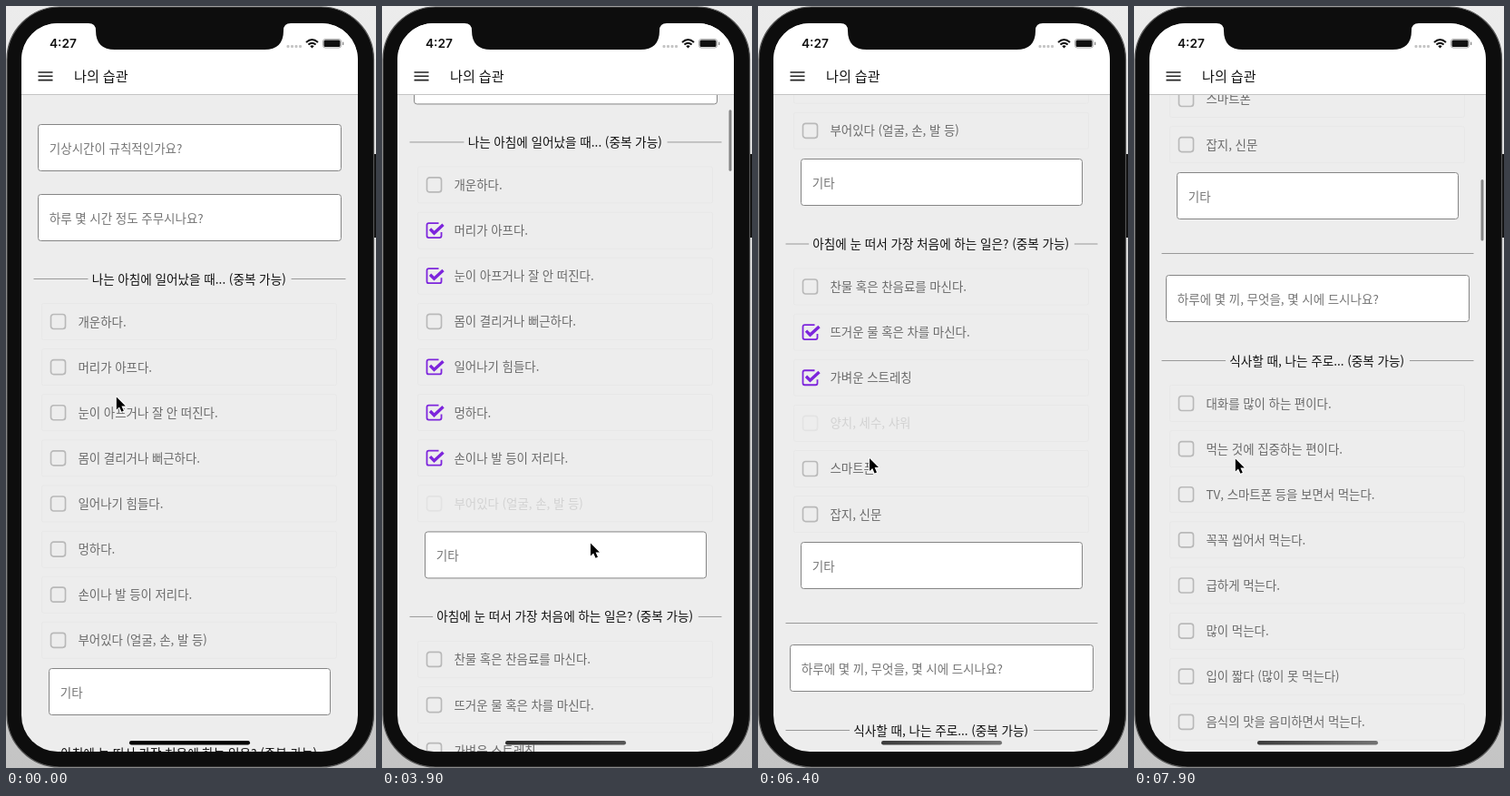
An HTML page with a canvas that plays this animation: 408 px wide and 839 px high, repeating every 8 s.

```html
<!DOCTYPE html>
<html lang="ko">
<head>
<meta charset="utf-8">
<style>
html, body { margin: 0; width: 100%; height: 100%; overflow: hidden; }
canvas { display: block; }
</style>
</head>
<body>
<canvas id="stage" width="408" height="839"></canvas>
<script>
const ctx = document.getElementById('stage').getContext('2d');
const LOOP = 8000, STEP = 100, ROW = 50.12, TAP = 320;
const KOREAN = '"Noto Sans CJK KR", "Noto Sans CJK", sans-serif';
const INK = '#111', BEZEL = '#0d0d0d', LINE = '#999', PURPLE = '#7d25dc';

// Page positions are measured at scroll 0.
const questions = [
  { y: 130.5, label: '기상시간이 규칙적인가요?' },
  { y: 207.5, label: '하루 몇 시간 정도 주무시나요?' },
  { y: 1264.5, label: '하루에 몇 끼, 무엇을, 몇 시에 드시나요?' },
];
const sections = [
  {
    title: '나는 아침에 일어났을 때... (중복 가능)', y: 300.5, other: true,
    rows: ['개운하다.', '머리가 아프다.', '눈이 아프거나 잘 안 떠진다.', '몸이 결리거나 뻐근하다.',
      '일어나기 힘들다.', '멍하다.', '손이나 발 등이 저리다.', '부어있다 (얼굴, 손, 발 등)'],
  },
  {
    title: '아침에 눈 떠서 가장 처음에 하는 일은? (중복 가능)', y: 823, other: true,
    rows: ['찬물 혹은 찬음료를 마신다.', '뜨거운 물 혹은 차를 마신다.', '가벼운 스트레칭',
      '양치, 세수, 샤워', '스마트폰', '잡지, 신문'],
  },
  {
    title: '식사할 때, 나는 주로... (중복 가능)', y: 1358.5,
    rows: ['대화를 많이 하는 편이다.', '먹는 것에 집중하는 편이다.', 'TV, 스마트폰 등을 보면서 먹는다.',
      '꼭꼭 씹어서 먹는다.', '급하게 먹는다.', '많이 먹는다.', '입이 짧다 (많이 못 먹는다)',
      '음식의 맛을 음미하면서 먹는다.'],
  },
];

const clamp = v => Math.min(1, Math.max(0, v));
const ramp = (t, start, length) => clamp((t - start) / length);
const ease = p => p * p * (3 - 2 * p);
const rowY = (section, i) => section.y + 47 + i * ROW;

const flicks = [
  { start: 3650, length: 735, distance: 561 },
  { start: 6670, length: 800, distance: 407 },
];
const scrollAt = t => flicks.reduce((sum, f) => sum + f.distance * ease(ramp(t, f.start, f.length)), 0);
const barAlpha = t => Math.max(...flicks.map(f =>
  ramp(t, f.start, 100) - ramp(t, f.start + f.length + 800, 300)));

// Evenly timed taps; each dims its row, then ticks the box.
const tapSeries = (section, rows, start, gap) =>
  rows.map((row, i) => ({ section, row, time: start + i * gap, ticks: true }));
const taps = [
  ...tapSeries(sections[0], [1, 2, 4, 5, 6], 900, 600),
  ...tapSeries(sections[1], [1, 2, 3], 5500, 300),
];
const heldRow = { section: sections[0], row: 7, time: flicks[0].start, ticks: false };
const presses = [...taps, heldRow];
const pressAlpha = (press, t) => 1 - 0.8 * (ramp(t, press.time, 100) - ramp(t, press.time + TAP, 250));

// The pointer rests on each tapped box and glides through a few free points.
const pointerStops = [
  ...taps.flatMap(({ section, row, time }) => {
    const y = rowY(section, row) - scrollAt(time) - 4;
    return [[time - 50, 60, y], [time + 50, 60, y]];
  }),
  [0, 121, 430], [1600, 64, 490], [3000, 85, 633], [3650, 235, 700], [4100, 225, 513],
  [4700, 126, 458], [5100, 126, 458], [6670, 192, 545], [7000, 188, 404], [7900, 111, 498],
].sort((a, b) => a[0] - b[0]);

function pointerAt(t) {
  const i = pointerStops.findIndex(stop => stop[0] > t);
  if (i < 0) return pointerStops.at(-1).slice(1);
  const [t0, x0, y0] = pointerStops[i - 1], [t1, x1, y1] = pointerStops[i];
  const p = ease((t - t0) / (t1 - t0));
  return [x0 + (x1 - x0) * p, y0 + (y1 - y0) * p];
}

function text(str, x, y, color, size = 13.5, weight = 400, family = KOREAN) {
  ctx.font = `${weight} ${size}px ${family}`;
  ctx.wordSpacing = '0.6px';
  ctx.fillStyle = color;
  ctx.fillText(str, x, y);
  return ctx.measureText(str).width;
}

function roundBox(x, y, w, h, r, fill, stroke, width = 1) {
  ctx.beginPath();
  ctx.roundRect(x, y, w, h, r);
  if (fill) { ctx.fillStyle = fill; ctx.fill(); }
  if (stroke) { ctx.strokeStyle = stroke; ctx.lineWidth = width; ctx.stroke(); }
}

function strokePath(d, color, width = 1) {
  ctx.strokeStyle = color;
  ctx.lineWidth = width;
  ctx.stroke(new Path2D(d));
}

function fillPath(d, color) {
  ctx.fillStyle = color;
  ctx.fill(new Path2D(d));
}

function drawInput(label, x, y) {
  roundBox(x, y, 405 - 2 * x, 51, 3, '#fff', '#858585');
  text(label, x + 12.3, y + 31, '#757575');
}

function drawHeading(title, y) {
  ctx.textAlign = 'center';
  const gap = text(title, 201.7, y + 5, INK, 13.62, 500) / 2 + 5;
  ctx.textAlign = 'left';
  strokePath(`M30.5 ${y}H${202.5 - gap}M${202.5 + gap} ${y}H374.5`, LINE);
}

function drawRow(label, y, press, t) {
  roundBox(39.5, y - 20, 325, 40, 2, null, '#e8e8e8');
  ctx.save();
  if (press) ctx.globalAlpha = pressAlpha(press, t);
  text(label, 79.5, y + 5, '#6a6a6a', 13.45, 300);
  ctx.translate(49.5, y - 8);
  if (press && press.ticks && t >= press.time + TAP) {
    strokePath('M13 0H2Q0 0 0 2V14Q0 16 2 16H14Q16 16 16 14V10', PURPLE, 1.8);
    strokePath('M3.5 6.5L8 11L18 1.8', PURPLE, 3.4);
  } else {
    roundBox(0, 0, 16, 16, 3, null, '#b9b9b9', 1.7);
  }
  ctx.restore();
}

function drawSection(section, t) {
  drawHeading(section.title, section.y);
  section.rows.forEach((label, i) => {
    const press = presses.find(p => p.section === section && p.row === i);
    drawRow(label, rowY(section, i), press, t);
  });
  if (section.other) drawInput('기타', 47.5, Math.floor(rowY(section, section.rows.length) - 19) + 0.5);
}

function drawPage(t, scroll) {
  ctx.save();
  ctx.translate(0, -scroll);
  questions.forEach(({ label, y }) => drawInput(label, 35.5, y));
  strokePath('M30.5 1240.5H374.5', LINE);
  sections.forEach(section => drawSection(section, t));
  ctx.restore();
  ctx.globalAlpha = barAlpha(t);
  roundBox(382.5, 100 + scroll * 0.094, 3, 67.5, 1.5, '#858585');
  ctx.globalAlpha = 1;
}

function drawHeader() {
  ctx.fillStyle = '#fff';
  ctx.fillRect(17, 19, 371, 78);
  strokePath('M17 97.5H388', '#c4c4c4');
  strokePath('M35.5 73H51.5M35.5 77.3H51.5M35.5 81.6H51.5', '#222', 1.6);
  text('나의 습관', 75, 83, INK, 15.1, 500);
  text('4:27', 48, 46, INK, 13.7, 600, 'Inter, sans-serif');
  for (let x = 309.5; x < 325; x += 4.5) roundBox(x, 43, 3, 3, 1, '#c4c4c4');
  strokePath('M331 40Q337.5 34 344 40M333.4 42.6Q337.5 38.8 341.6 42.6', INK, 2);
  fillPath('M335.3 44.2Q337.5 42.2 339.7 44.2L337.5 46.6Z', INK);
  roundBox(349.5, 36.5, 20, 9.5, 2.5, null, '#aaa');
  roundBox(350.5, 37.5, 18, 7.5, 1.5, INK);
  roundBox(371, 39.5, 1.3, 3.5, 0.6, '#888');
}

function drawPhone() {
  const backdrop = ctx.createLinearGradient(0, 0, 0, 839);
  backdrop.addColorStop(0, '#ececec');
  backdrop.addColorStop(1, '#c4c4c4');
  ctx.fillStyle = backdrop;
  ctx.fillRect(0, 0, 408, 839);
  ctx.fillStyle = INK;
  ctx.fillRect(403, 163, 5, 92);
  roundBox(1, 1, 404.5, 837, 58, BEZEL, '#555', 1.2);
}

function drawHomeBar(scroll) {
  const shade = v => `rgb(${Array(3).fill(v * clamp(scroll / 200))})`;
  const fill = ctx.createLinearGradient(136, 0, 269, 0);
  fill.addColorStop(0, shade(60));
  fill.addColorStop(1, shade(115));
  roundBox(136, 809, 133, 4.5, 2.2, fill);
}

function drawPointer([x, y]) {
  const arrow = 'M0 0V14L3.2 10.9L5.6 16.3L8 15.3L5.6 10H10Z';
  ctx.save();
  ctx.translate(x + 0.8, y + 0.5);
  ctx.lineJoin = 'round';
  strokePath(arrow, '#fff', 2);
  fillPath(arrow, '#000');
  ctx.restore();
}

function draw(t) {
  const scroll = scrollAt(t);
  drawPhone();
  ctx.save();
  ctx.beginPath();
  ctx.roundRect(17, 19, 371, 802, 40);
  ctx.clip();
  ctx.fillStyle = '#ededed';
  ctx.fillRect(17, 19, 371, 802);
  drawPage(t, scroll);
  drawHeader();
  drawHomeBar(scroll);
  fillPath('M91 18V19Q99 19 99 27Q99 48 120 48H285Q306 48 306 27Q306 19 314 19V18Z', BEZEL);
  ctx.restore();
  drawPointer(pointerAt(t));
}

function tick() {
  draw(Math.floor(performance.now() % LOOP / STEP) * STEP);
  requestAnimationFrame(tick);
}
tick();
</script>
</body>
</html>
```
